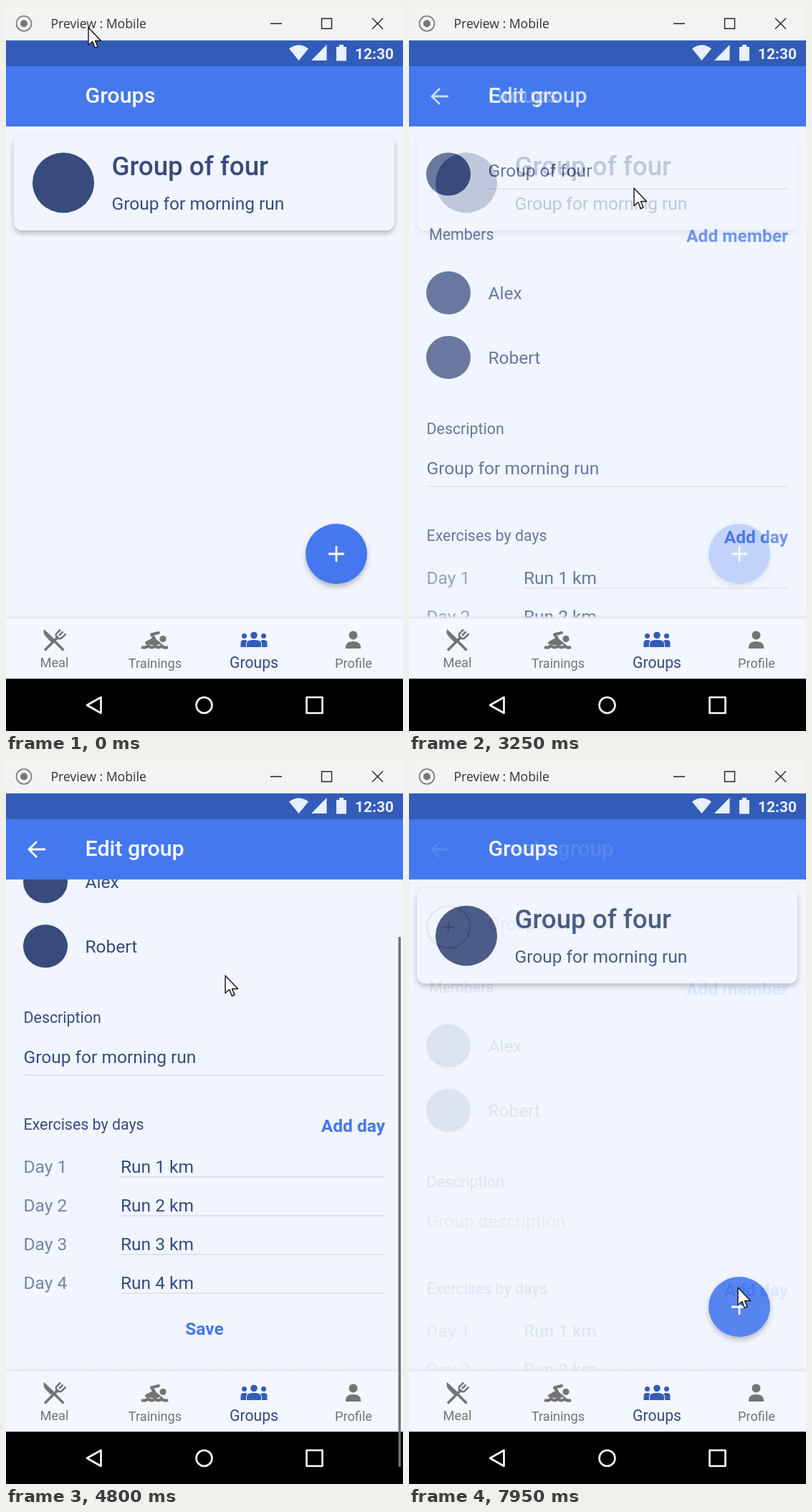
Animation, 554 px wide and 1011 px high, one loop 8 s. Source, as an HTML page:

```html
<!DOCTYPE html>
<html lang="en">
<head>
<meta charset="utf-8">
<title>Groups</title>
<style>
html, body { margin: 0; width: 100%; height: 100%; overflow: hidden; background: #f0f5ff; }
svg { display: block; width: 100vw; height: 100vh; }
text { font-family: Roboto, sans-serif; white-space: pre; }
</style>
</head>
<body>
<svg id="stage" viewBox="0 0 554 1011"></svg>
<script>
const LOOP = 8000;
const BG = '#f0f5ff', INK = '#394b7c', BLUE = '#4478ee', DEEP = '#325cb8', GRAY = '#747474', PALE = '#7883ab';

const text = (x, y, size, str, fill = INK, weight = 400, anchor = 'start') =>
  `<text x="${x}" y="${y}" font-size="${size}" fill="${fill}" font-weight="${weight}" text-anchor="${anchor}">${str}</text>`;
const rect = (x, y, w, h, fill, extra = '') =>
  `<rect x="${x}" y="${y}" width="${w}" height="${h}" fill="${fill}" ${extra}/>`;
const disc = (x, y, rx, ry, fill, extra = '') =>
  `<ellipse cx="${x}" cy="${y}" rx="${rx}" ry="${ry}" fill="${fill}" ${extra}/>`;
const line = (d, color, width, extra = '') =>
  `<path d="${d}" fill="none" stroke="${color}" stroke-width="${width}" ${extra}/>`;
const shape = (d, fill, extra = '') => `<path d="${d}" fill="${fill}" ${extra}/>`;
const rule = (x, y) => rect(x, y - 1, 529 - x, 2, '#dfe2ee');
const link = (y, str) => text(529, y, 24.5, str, BLUE, 700, 'end');

const header = (title, back) => rect(0, 84, 554, 84, BLUE) +
  text(110.5, 135, 30.4, title, '#fff', 500) +
  (back ? line('M55 126H32M43 115L32 126L43 137', '#fff', 2.8) : '');

const listPage = () => rect(0, 84, 554, 770, BG) +
  rect(11, 180, 531, 133, BG, 'rx="12" filter="url(#shade)"') +
  disc(80, 246.5, 43, 42, INK) +
  text(147.5, 236, 36.7, 'Group of four', INK, 500) +
  text(147.5, 284, 24.5, 'Group for morning run') +
  disc(461, 764, 43, 42, BLUE, 'filter="url(#shade)"') +
  line('M450 764H472M461 753V775', '#fff', 2.8) +
  header('Groups');

const member = (y, name) => disc(55, y, 31, 30, INK) + text(110.5, y + 9, 24.5, name);

const day = n => {
  const y = 752 + n * 54;
  return text(24.5, y, 24.5, 'Day ' + n, PALE) + text(160, y, 24.5, `Run ${n} km`) + rule(160, y + 6);
};

const formPage = (id, title, avatar, name, about, color) => rect(0, 84, 554, 770, BG) +
  `<g id="${id}">` + avatar +
  text(110.5, 238, 24.5, name, color) + rule(110.5, 255) +
  text(28, 326, 21.4, 'Members') + link(329, 'Add member') +
  member(400, 'Alex') + member(490, 'Robert') +
  text(24.5, 597, 21.4, 'Description') +
  text(24.5, 653, 24.5, about, color) + rule(24.5, 670) +
  text(24.5, 746, 21.4, 'Exercises by days') + link(749, 'Add day') +
  [1, 2, 3, 4].map(day).join('') +
  text(277, 1032, 24.5, 'Save', BLUE, 700, 'middle') +
  '</g>' + header(title, true);

const windowBar = () => rect(0, 0, 554, 48, '#f3f3f3') +
  disc(25, 24.5, 10.5, 10.5, 'none', 'stroke="#777" stroke-width="1.6"') + disc(25, 24.5, 5, 5, '#777') +
  `<text x="62.5" y="31" font-size="17.6" fill="#333" style="font-family:'Open Sans',sans-serif">Preview : Mobile</text>` +
  line('M369 24.5H385M440.5 17.5H454.5V31.5H440.5ZM511 17L526 32M526 17L511 32', '#222', 1.4);

const statusBar = () => rect(0, 48, 554, 36, DEEP) +
  shape('M395 59.5Q408.5 49.5 422 59.5L408.5 76ZM426 76L447.5 54V76ZM461 57H465V54H471V57H475V76.5H461Z', '#e9f0ff') +
  text(487, 74, 21, '12:30', '#e9f0ff', 700);

const person = (x, y, r, w, h) => disc(x, y, r, r, DEEP) +
  shape(`M${x - w} 894V${894 - h + 4}Q${x - w} ${894 - h} ${x} ${894 - h}Q${x + w} ${894 - h} ${x + w} ${894 - h + 4}V894Z`, DEEP);

const mealIcon = () =>
  shape('M53 869L69 884L65 889L56 880Q51 875 53 869Z', GRAY) +
  line('M68 886L80.500 898.500M54 898.500L73 879.500', GRAY, 3.6) +
  line('M76 869.500L70 875.500Q69 881 73 882Q77 883 79 880L83.500 875.500M79.500 872.500L74 878', GRAY, 2.5);

const swimIcon = () => disc(219, 882.5, 4.6, 4.6, GRAY) +
  line('M196 888L207 882L203 876.500L213 874', GRAY, 4, 'stroke-linejoin="round" stroke-linecap="round"') +
  shape('M196 889L206 880L217 889Q207 894 196 889Z', GRAY) +
  line('M189 894Q195 896 198 892Q204 897 208 892Q213 897 217 892Q220 896 226 894', GRAY, 4.2);

const groupIcon = () => person(332.5, 878.5, 3.5, 5, 10) + person(359.5, 878.5, 3.5, 5, 10) +
  shape('M336 894V889Q336 884 346 884Q356 884 356 889V894Z', DEEP, `stroke="${BG}" stroke-width="2" paint-order="stroke"`) +
  disc(346, 877.5, 4.8, 4.8, DEEP);

const tabBar = () => rect(0, 849, 554, 5, 'url(#lift)') + rect(0, 854, 554, 84, '#f3f7ff') +
  mealIcon() + swimIcon() + groupIcon() +
  disc(484.500, 877.500, 6, 6, GRAY) + shape('M474 896V893Q475 886 484.500 886Q494 886 495 893V896Z', GRAY) +
  text(67.5, 922, 18.2, 'Meal', GRAY, 400, 'middle') +
  text(208, 923, 18.2, 'Trainings', GRAY, 400, 'middle') +
  text(346, 923, 21.2, 'Groups', '#32497f', 400, 'middle') +
  text(485, 923, 18.2, 'Profile', GRAY, 400, 'middle');

const systemBar = () => rect(0, 938, 554, 73, '#000') +
  line('M113 975L132.500 964V986ZM419.500 964H441.500V986H419.500Z', '#fff', 2.6, 'stroke-linejoin="round"') +
  disc(276.5, 975, 11, 11, 'none', 'stroke="#fff" stroke-width="2.6"');

const outline = 'stroke="#111" stroke-width="1.4" stroke-linejoin="round"';
const stage = document.getElementById('stage');
stage.setAttribute('preserveAspectRatio', 'none');
stage.innerHTML = `<defs>
  <filter id="shade" x="-20%" y="-20%" width="140%" height="150%">
    <feDropShadow dx="0" dy="4" stdDeviation="3.5" flood-color="#000" flood-opacity=".25"/>
  </filter>
  <linearGradient id="lift" x2="0" y2="1">
    <stop stop-color="#e3e8f1" stop-opacity="0"/><stop offset="1" stop-color="#e0e5ee"/>
  </linearGradient></defs>` +
  `<g>${listPage()}</g>` +
  `<g id="edit">${formPage('editBody', 'Edit group', disc(55, 234.5, 31, 30, INK),
    'Group of four', 'Group for morning run', INK)}</g>` +
  `<g id="create">${formPage('createBody', 'Create group',
    disc(55, 234.5, 30, 29, 'none', `stroke="${INK}" stroke-width="2"`) + line('M47 234.500H63M55 226.500V242.500', INK, 2),
    'Group name', 'Group description', PALE)}</g>` +
  tabBar() + systemBar() + statusBar() + windowBar() +
  rect(547.5, 72, 3.4, 739, '#6e7077', 'id="thumb" rx="1"') +
  `<path id="arrow" d="M0 0V24.500L5.800 19.500L9.300 28.500L13 26.800L9.500 18.500H17.500Z" fill="#fff" ${outline}/>
  <path id="hand" d="M-2 1.500Q0 -1.500 2 1.500V9Q4 6.500 6 9Q8.500 7.500 10 10Q14 8.500 15.500 13V18Q15 22 12.500 25.500H1.500Q-2 20 -7.500 15Q-7.500 11 -2 14Z
    M2 9V13M6 9V13.500M10 10V14" fill="#fff" ${outline}/>`;

const el = id => document.getElementById(id);
const edit = el('edit'), create = el('create'), body = el('editBody');
const thumb = el('thumb'), arrow = el('arrow'), hand = el('hand');

const clamp = v => Math.min(1, Math.max(0, v));
const ease = v => (1 - Math.cos(Math.PI * clamp(v))) / 2;
const FADE = 300, OPEN = 3055, BACK = 6480, NEW = 7889;
const fade = (t, start) => ease((t - start) / FADE);

// time, x, y
const path = [
  [0, 115, 30], [700, 205, 384], [1000, 205, 384], [1150, 209, 376], [1600, 209, 376],
  [2500, 312, 252], [3250, 314, 254], [3900, 308, 297], [4300, 308, 297], [4800, 306, 302],
  [5050, 306, 302], [5950, 49, 120], [6620, 49, 120], [7500, 459, 738], [8000, 459, 737]
];

function pointer(t) {
  const i = path.findIndex(p => p[0] > t);
  const [t0, x0, y0] = path[i - 1], [t1, x1, y1] = path[i];
  const k = ease((t - t0) / (t1 - t0));
  return [x0 + (x1 - x0) * k, y0 + (y1 - y0) * k];
}

function isHot(t, x, y) {
  if (t >= OPEN && t < BACK) return t > OPEN + FADE && x > 25 && x < 62 && y > 106 && y < 146;
  if (t >= NEW) return false;
  const onCard = x > 11 && x < 542 && y > 180 && y < 313;
  return onCard || Math.hypot(x - 461, y - 764) < 43;
}

function show(node, on) { node.style.display = on ? '' : 'none'; }

function draw(t) {
  const editing = fade(t, OPEN) - fade(t, BACK), creating = fade(t, NEW);
  edit.setAttribute('opacity', editing);
  show(edit, editing > 0);
  create.setAttribute('opacity', creating);
  show(create, creating > 0);

  const scroll = 229 * ease((t - 4320) / 440);
  body.setAttribute('transform', `translate(0 ${-scroll})`);
  thumb.setAttribute('y', 72 + scroll * 0.769);
  show(thumb, t >= 4200 && t < BACK);

  const [x, y] = pointer(t), hot = isHot(t, x, y);
  show(hand, hot);
  show(arrow, !hot);
  (hot ? hand : arrow).setAttribute('transform', `translate(${x} ${y})`);
}

const began = performance.now();
function tick() {
  draw((performance.now() - began) % LOOP);
  requestAnimationFrame(tick);
}
tick();
</script>
</body>
</html>
```
